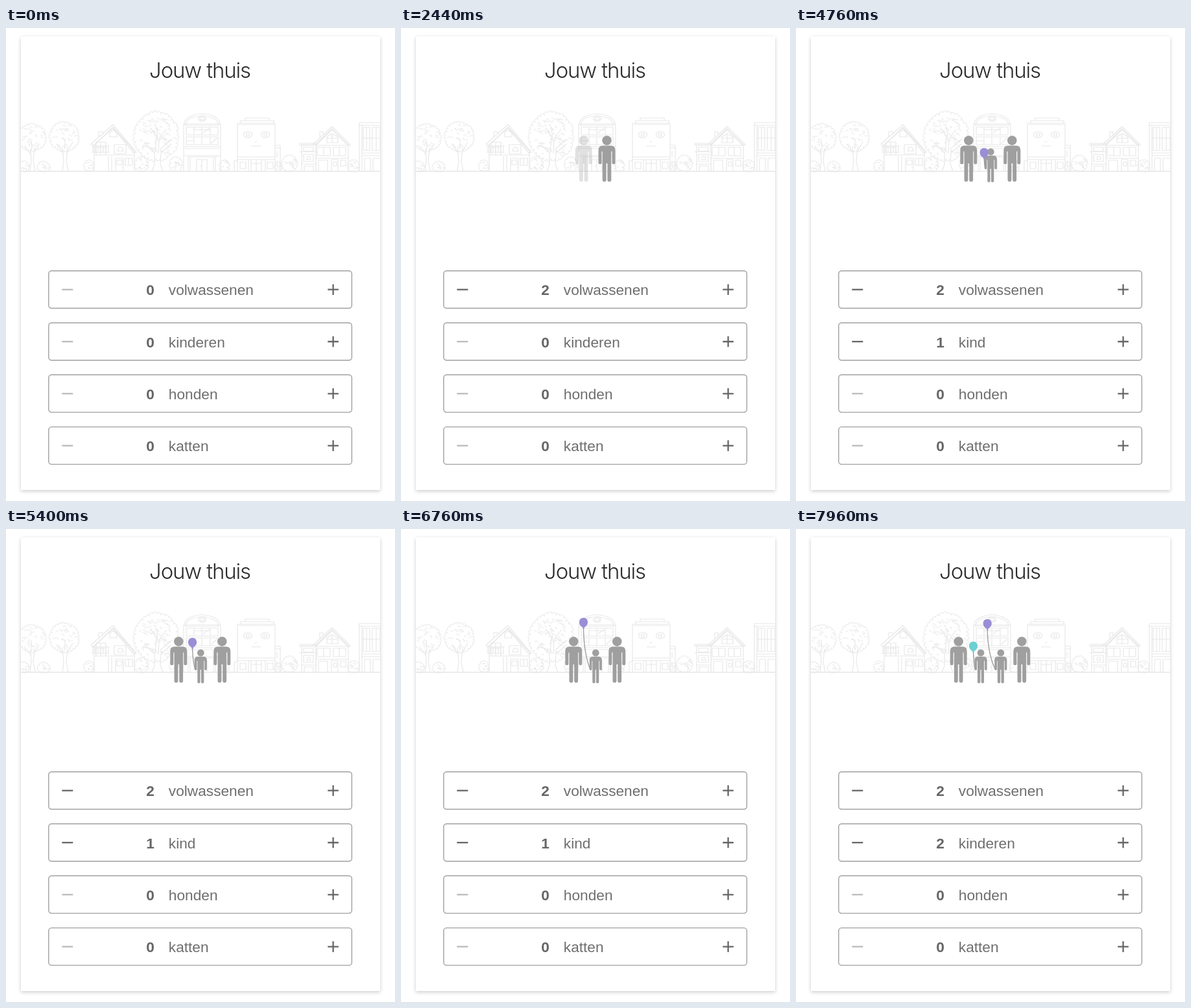
These frames come from a looping animation (600 px wide and 730 px high, 8000 ms). An HTML page:

```html
<!DOCTYPE html>
<html lang="nl">
<head>
<meta charset="utf-8">
<title>Jouw thuis</title>
<style>
  html, body { margin: 0; width: 100%; height: 100%; overflow: hidden; background: #fff; }
  #card { position: absolute; left: 23px; top: 13px; width: 554px; height: 700px; background: #fff;
    box-shadow: 0 2px 6px rgba(0,0,0,.2); }
  svg { position: absolute; left: 0; top: 0; width: 600px; height: 730px; }
  .title { font: 300 33px Inter, "Liberation Sans", sans-serif; letter-spacing: -.035em; fill: #2b2b2b; text-anchor: middle; }
  .row text { font: 22.7px "Liberation Sans", Arial, sans-serif; fill: #6e6e6e; }
  .row .num { font-weight: 700; fill: #666; }
  .row rect { fill: none; stroke: #a0a0a0; stroke-width: 1.4; }
  .row path { fill: none; stroke: #666; stroke-width: 2.3; }
  .row .off { stroke: #bbb; }
  #street { fill: none; stroke: #e8e8e8; stroke-width: 1.2; stroke-linejoin: round; stroke-linecap: round; }
  #street .solid { fill: #fff; }
  .figure { fill: #9f9f9f; }
  .string { fill: none; stroke: #9a9a9a; stroke-width: 1.3; }
</style>
</head>
<body>
<div id="card"></div>
<svg viewBox="0 0 600 730">
  <defs>
    <clipPath id="inside"><rect x="23" y="100" width="554" height="140"/></clipPath>
    <g id="person">
      <circle cy="173.6" r="7.3"/>
      <path d="M-13 188.5q0-7 7-7h12q7 0 7 7v19.2a2.5 2.5 0 0 1-5 0V190.5h-1.2V234.3a2.9 2.9 0 0 1-5.9 0V209h-1.8v25.3a2.9 2.9 0 0 1-5.9 0V190.5H-8v17.2a2.5 2.5 0 0 1-5 0z"/>
    </g>
    <path id="balloon" d="M0-8C4.2-8 6.6-4.8 6.6-1.2C6.6 3 3.2 6 .8 7.2L1.8 8.6H-1.8L-.8 7.2C-3.2 6-6.6 3-6.6-1.2C-6.6-4.8-4.2-8 0-8z"/>
  </defs>

  <text class="title" x="299" y="77">Jouw thuis</text>

  <g id="street" clip-path="url(#inside)">
    <path d="M23 221.2H577" stroke="#e2e2e2"/>
    <!-- trunks and branches -->
    <path d="M37 221l2-16-1-19M45 221l-3-16 2-20M38 195l-9-13M43 192l8-13M40 186l-1-13M87 221l2-15-2-22M96 221l-3-16 2-20M88 192l-10-13M95 190l8-14M91 186v-15"/>
    <path d="M225 221l4-10v-18l-16-16M242 221l-4-11 1-17 16-14M230 192l2-25-9-13M235 193l1-22 11-15M229 186l-18-4M238 187l17-15M234 171l-2-18"/>
    <!-- gabled house -->
    <path class="solid" d="M136 221V181l29-28 33 37v31z"/>
    <path d="M131 179l34-30 36 43-4 1-32-39-31 28zM143 168v-8h6v3M160 161l5-4 6 5v6h-11zM136 196h62M154 176h-15v20M154 176v20M146 176v20M139 184h15M167 180h18v14h-18zM172 190l2-6h5l2 6zM169 221v-20h12v20M171 204h8v7h-8zM179 214v1M184 201h11v11h-11zM189 201v11M158 198v23M163 198v23"/>
    <path d="M133 182h26M133 192h26M134 182v10M138 182v10M142 182v10M146 182v10M150 182v10M154 182v10M158 182v10"/>
    <!-- arched building -->
    <path class="solid" d="M274 221V151q1-10 9-14 19-9 39 0 8 4 9 14v70z"/>
    <path d="M277 150q1-8 8-11 17-7 34 0 8 3 9 11M274 148h57M276 150h53M278 153h49v12h-49zM278 168h49v12h-49zM274 183h57M276 186h53M274 197h57M280 199h46"/>
    <path d="M290 153v12M302 153v12M315 153v12M290 157h24M290 168v12M302 168v12M315 168v12M279 174h11M304 162l9-7M317 178l8-8M281 200v21M284 200v21M294 203v18M302 203v18M310 203v18M294 203h16M320 200v21M323 200v21M300 212v2"/>
    <ellipse cx="302.500" cy="140" rx="6" ry="4"/><ellipse cx="302.500" cy="140" rx="3.500" ry="2"/>
    <!-- building with a face -->
    <path class="solid" d="M357 221v-74h58v74zM362 147v-4h51v4zM369 143v-4h37v4zM352 221v-16h5v16zM415 221v-40h8v40z"/>
    <path d="M359 149h54M357 199h58M357 203h58M374 203v18M378 203v18M394 203v18M400 203v18M378 209h16M386 203v18M361 207h9v10h-9zM403 207h9v10h-9zM379 182h14M384 176l3-1M415 185h8M418 190v9M418 205v8"/>
    <g id="eyes"></g>
    <!-- house with side wing -->
    <path class="solid" d="M478 221v-42l25-24 25 25v41z"/>
    <path d="M473 180l30-28 28 28-3 2-25-25-26 25zM484 168v-8h5v4M495 177v-9l8-5 9 5v9zM503 164v13M495 170h17M476 181h52M480 184h20v13h-20zM505 184h19v13h-19zM490 184v13M514 184v13M478 201h50M482 221v-17h14v17M502 221v-18h10v18M505 207h5v6h-5zM516 204h8v9h-8z"/>
    <path class="solid" d="M456 221v-41h22v41z"/>
    <path d="M453 178h25v3h-25zM453 191h25M459 184h15v6h-15zM459 195h15v11h-15zM464 203l1-5h4l1 5zM456 210h22M460 213h14v8M460 213v8"/>
    <!-- right edge -->
    <path d="M545 221v-75h34M549 221v-71h30M544 150h5M551 153h10v36h-10zM556 153v36M565 153h12v36h-12zM571 153v36M549 170h30M549 193h30M549 197h30M553 221v-20h9v20M566 201h13M566 201v20"/>
  </g>

  <g id="people"></g>
  <g id="rows"></g>
</svg>
<script>
const NS = 'http://www.w3.org/2000/svg', LOOP = 8000;
const $ = id => document.getElementById(id);

function add(parent, tag, attrs, text) {
  const el = document.createElementNS(NS, tag);
  for (const k in attrs) el.setAttribute(k, attrs[k]);
  if (text) el.textContent = text;
  return parent.appendChild(el);
}

// --- foliage: a scalloped edge with scribbled leaves inside
let seed = 7;
const rnd = () => (seed = seed * 16807 % 2147483647) / 2147483647;

function foliage(cx, cy, rx, ry, bumps, leaves) {
  let d = '';
  for (let i = 0; i <= bumps; i++) {
    const a = i / bumps * 2 * Math.PI + 1.6, r = .91 + rnd() * .09;
    const x = (cx + rx * r * Math.cos(a)).toFixed(1), y = Math.min(220, cy + ry * r * Math.sin(a)).toFixed(1);
    const s = (rx / bumps * 2.6).toFixed(1);
    d += i ? `A${s} ${s} 0 0 1 ${x} ${y}` : `M${x} ${y}`;
  }
  for (let i = 0; i < leaves; i++) {
    const a = rnd() * 6.28, r = Math.sqrt(rnd()) * .85;
    const x = cx + rx * r * Math.cos(a), y = Math.min(217, cy + ry * r * Math.sin(a));
    d += `M${x.toFixed(1)} ${y.toFixed(1)}q${(rnd() * 4).toFixed(1)} -3 ${(2 + rnd() * 3).toFixed(1)} ${(rnd() * 4 - 1).toFixed(1)}`;
  }
  add($('street'), 'path', { d, 'stroke-width': 1 });
}
[[40, 169, 21, 20, 24, 22], [90, 168, 22, 22, 26, 26], [232, 167, 34, 37, 34, 75],
 [27, 214, 8, 8, 10, 6], [58, 215, 9, 8, 11, 6], [128, 213, 6, 9, 9, 6], [209, 211, 9, 12, 12, 12],
 [262, 211, 8, 12, 11, 10], [337, 213, 6, 9, 9, 6], [437, 209, 11, 12, 14, 14],
 [536, 213, 8, 9, 10, 8], [420, 214, 4, 7, 7, 3]].forEach(f => foliage(...f));

for (const x of [373, 400]) {
  add($('eyes'), 'ellipse', { cx: x, cy: 164.5, rx: 6.5, ry: 5 });
  add($('eyes'), 'circle', { cx: x, cy: 164.5, r: 2.5 });
}

// --- counter rows
const rows = [['volwassenen', 'volwassene'], ['kinderen', 'kind'], ['honden'], ['katten']].map((words, i) => {
  const g = add($('rows'), 'g', { class: 'row', transform: `translate(0 ${(i * 80.3).toFixed(1)})` });
  add(g, 'rect', { x: 65.8, y: 374.7, width: 467.6, height: 57.8, rx: 4.5 });
  add(g, 'path', { d: 'M496.3 403.7h16.600M504.600 395.400v16.600' });
  return {
    words,
    minus: add(g, 'path', { d: 'M86.300 403.700h17' }),
    num: add(g, 'text', { class: 'num', y: 412.3 }),
    label: add(g, 'text', { y: 412.3 })
  };
});

function showRows(counts) {
  const shift = counts[0] === 1 ? 6.3 : 0;
  rows.forEach((r, i) => {
    const n = counts[i] || 0;
    r.minus.setAttribute('class', n ? '' : 'off');
    r.num.textContent = n;
    r.num.setAttribute('x', 216.2 + shift);
    r.label.textContent = n === 1 ? r.words[1] : r.words[0];
    r.label.setAttribute('x', 250.8 + shift);
  });
}

// --- family: places gives x per stage, from the stage of birth onwards
const starts = [0, 800, 2440, 4160, 7040];
const counts = [[0, 0], [1, 0], [2, 0], [2, 1], [2, 2]];
const family = [
  { born: 1, places: [299.8, 317.5, 333.3, 348.3], fade: [.15, 200] },
  { born: 2, places: [281.7, 266.3, 250.7], fade: [.3, 160] },
  { born: 3, places: [300.3, 315.8], fade: [.13, 200], color: '#9a8ed6' },
  { born: 4, places: [285], fade: [.13, 200], color: '#6bd0d3' }
];
for (const p of family) {
  p.g = add($('people'), 'g', { class: 'figure' });
  if (p.color) p.string = add(p.g, 'path', { class: 'string' });
  const body = add(p.g, 'use', { href: '#person' });
  if (p.color) {
    body.setAttribute('transform', 'translate(0 63.2) scale(.737)');
    p.balloon = add(p.g, 'use', { href: '#balloon', fill: p.color });
  }
}

// balloon flight: age, x from the child, y
const flight = [[360, -9.5, 207], [640, -10.3, 191.5], [920, -11.5, 181.8], [1240, -12.7, 176], [2000, -18, 155.5],
  [2600, -18.8, 145], [2900, -20.6, 143.2], [3300, -21.6, 143.8], [3840, -20.5, 147.3]];

function flightAt(age, k) {
  const last = flight.length - 1;
  let i = 0;
  while (i < last - 1 && age > flight[i + 1][0]) i++;
  const slope = j => {
    const a = flight[Math.max(0, j - 1)], b = flight[Math.min(last, j + 1)];
    return (b[k] - a[k]) / (b[0] - a[0]);
  };
  const a = flight[i], b = flight[i + 1], h = b[0] - a[0], u = Math.min(1, (age - a[0]) / h), v = 1 - u;
  return v * v * (1 + 2 * u) * a[k] + u * u * (3 - 2 * u) * b[k] + h * u * v * (v * slope(i) - u * slope(i + 1));
}

function fly(p, age) {
  const show = Math.max(0, Math.min(1, (age - 320) / 160));
  p.balloon.setAttribute('opacity', show);
  p.string.setAttribute('opacity', show);
  if (!show) return;
  const t = Math.max(360, age), x = flightAt(t, 1), y = flightAt(t, 2), top = Math.min(y + 8, 215);
  p.balloon.setAttribute('transform', `translate(${x} ${y})`);
  p.string.setAttribute('d', `M${x} ${top}Q${x + .5} ${top + (216 - top) * .6} -8.8 216`);
}

let shown = -1;
function draw(now) {
  const t = now % LOOP;
  let stage = 0;
  while (stage < 4 && t >= starts[stage + 1]) stage++;
  if (stage !== shown) showRows(counts[shown = stage]);
  for (const p of family) {
    const age = t - starts[p.born];
    if (age < 0) { p.g.setAttribute('opacity', 0); continue; }
    const most = stage === 1 ? .92 : 1;
    const [from, time] = p.fade;
    p.g.setAttribute('opacity', Math.min(most, from + (1 - from) * age / time));
    p.g.setAttribute('transform', `translate(${p.places[stage - p.born]} 0)`);
    if (p.color) fly(p, age);
  }
}
function tick() {
  draw(performance.now());
  requestAnimationFrame(tick);
}
tick();
</script>
</body>
</html>
```
